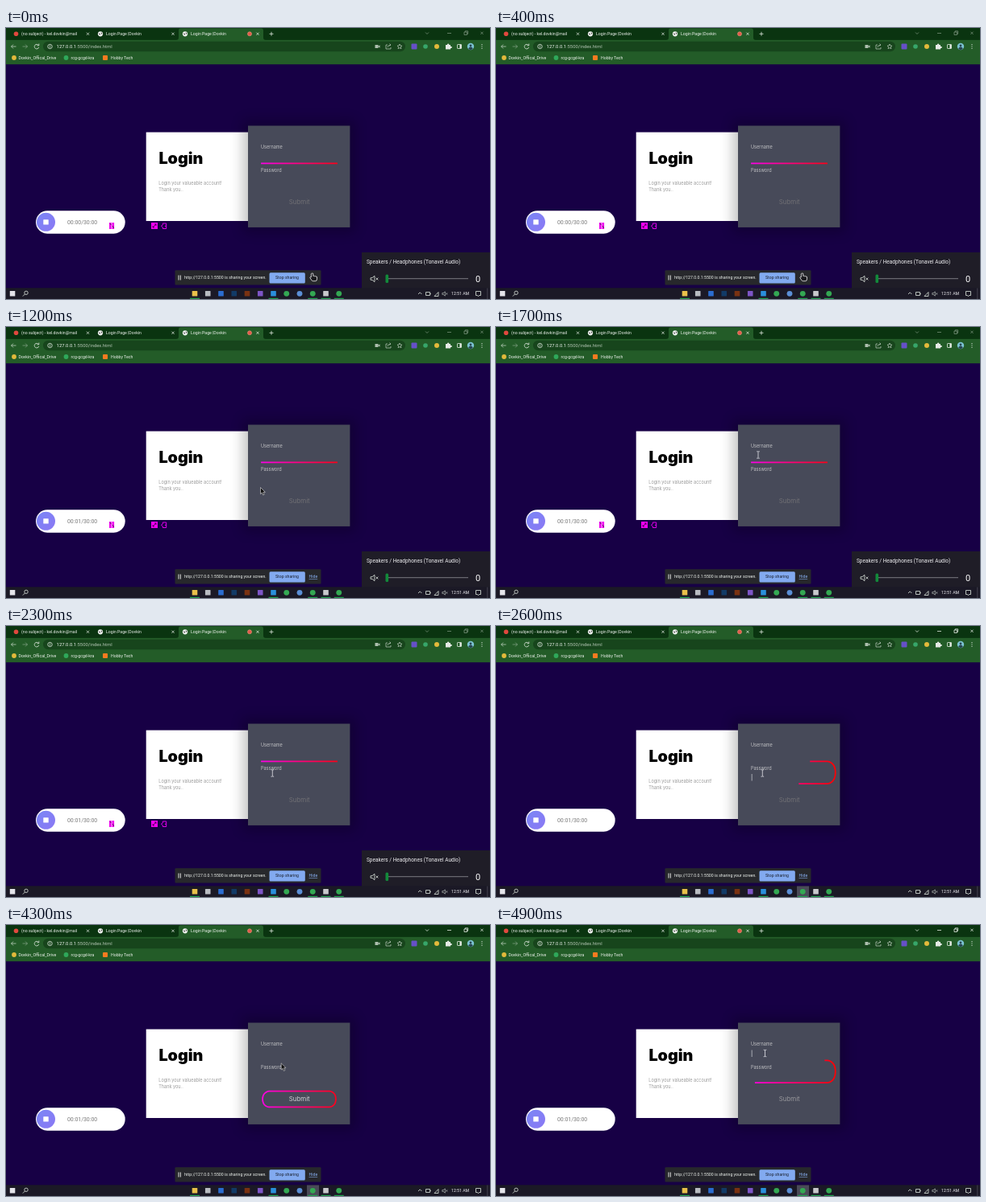
Write an HTML page that moves like this. It is 600 px wide and 337 px high and loops after 5000 ms.

```html
<!DOCTYPE html>
<html lang="en">
<head>
<meta charset="utf-8">
<title>Login page</title>
<style>
  html, body { margin: 0; width: 100%; height: 100%; overflow: hidden; background: #170045; }
  svg { display: block; width: 100vw; height: 100vh; }
  text { font: 5.2px Roboto, sans-serif; fill: #eef3ee; white-space: pre; }
  .card text { font: 5.53px Inter, sans-serif; fill: #c2c2c5; }
  .card .title { font-size: 19.75px; font-weight: 900; fill: #000; }
  .card .note { fill: #999; }
  .card .submit { font-size: 7.9px; fill: #707075; }
  .line { fill: none; stroke: #dfe8df; stroke-width: .8; }
</style>
</head>
<body>
<svg viewBox="0 0 600 337" preserveAspectRatio="none">
  <defs>
    <linearGradient id="glow" gradientUnits="userSpaceOnUse" x1="13" y1="193.5" x2="307" y2="193.5">
      <stop stop-color="#f0f"/><stop offset="1" stop-color="#f00"/>
    </linearGradient>
    <linearGradient id="violet" x2="1" y2="1">
      <stop stop-color="#7a86f5"/><stop offset="1" stop-color="#8b78f4"/>
    </linearGradient>
    <filter id="soft" x="-30%" y="-30%" width="160%" height="160%"><feGaussianBlur stdDeviation="7.9"/></filter>
    <g id="globe">
      <circle r="3.1" fill="#f2f5f2"/>
      <path d="M-2.4-.8L0-.2-.6 1.6ZM.8-2.2L2.4-.4 1 .6Z" fill="#444"/>
    </g>
    <path id="cross" class="line" d="M-1.6-1.6L1.6 1.6M1.6-1.6L-1.6 1.6"/>
    <g id="speaker" class="line">
      <path d="M-4.5-1.3h2L.4-3.8v7.6L-2.5 1.3h-2ZM2-1.4L4.8 1.4M4.8-1.4L2 1.4"/>
    </g>
  </defs>

  <rect width="600" height="337" fill="#170045"/>

  <!-- browser frame -->
  <rect width="600" height="15" fill="#0a3410"/>
  <rect y="14.900" width="600" height="30.300" fill="#235c28"/>
  <path d="M211 15q3 0 3-3V3q0-2.500 2.500-2.500h100q2.500 0 2.500 2.500v9q0 3 3 3Z" fill="#235c28"/>
  <circle cx="12.500" cy="7.300" r="2.800" fill="#e0483e"/>
  <text x="19" y="9.200">(no subject) - kel.dovkin@mail</text>
  <text x="124" y="9.200">Login Page |Dovkin</text>
  <text x="229" y="9.200">Login Page |Dovkin</text>
  <use href="#globe" x="117" y="7.300"/>
  <use href="#globe" x="222" y="7.300"/>
  <use href="#cross" x="101.500" y="7.300"/>
  <use href="#cross" x="207" y="7.300"/>
  <use href="#cross" x="312" y="7.300"/>
  <circle cx="302" cy="7.300" r="2.500" fill="#e25a4a" stroke="#f09a80" stroke-width=".6"/>
  <path class="line" d="M326.500 7.300h5M329 4.800v5"/>
  <g id="controls">
    <path class="line" d="M520 5.500l2 2 2-2M547 6.500h5M568 5h3.500v3.500h-3.500ZM569.200 5v-1.200h3.500v3.500h-1.200"/>
    <use href="#cross" x="590" y="6.300"/>
  </g>

  <rect x="46" y="16.800" width="449" height="12.400" rx="6.200" fill="#17451c"/>
  <path class="line" d="M12.500 23h-6m2.500-2.500L6.500 23 9 25.500" opacity=".8"/>
  <path class="line" d="M20.500 23h6m-2.500-2.500l2.500 2.500-2.500 2.500" opacity=".45"/>
  <path class="line" d="M40.300 21.500a2.800 2.800 0 1 0 .4 2.500M40.800 19.500v2.300h-2.300"/>
  <circle class="line" cx="54.500" cy="23" r="2.700"/>
  <path class="line" d="M54.500 22.500v2M54.500 21v.8"/>
  <text x="62.600" y="25.100" style="font-size:5.900px">127.0.0.1<tspan fill="#b4c6b4">:5500/index.html</tspan></text>
  <g opacity=".75">
    <path d="M457.500 21h4v4h-4ZM461.500 22.700l2-1.400v3.400l-2-1.400Z" fill="#dfe8df"/>
    <path class="line" d="M473 21h-2v5h6v-2M473 24q.5-3 4-3m-1.500-1.500l1.500 1.500-1.500 1.500"/>
    <path class="line" d="M488 20l.9 2 2.100.2-1.600 1.400.5 2.200-1.900-1.200-1.900 1.200.5-2.200-1.600-1.400 2.100-.2Z"/>
  </g>
  <rect x="502.500" y="19.500" width="7" height="7" rx="1" fill="#6650c8"/>
  <circle cx="520" cy="23" r="2.800" fill="#37a66a"/>
  <circle cx="534" cy="23" r="3" fill="#e2b93b"/>
  <path d="M545 21h2a1.200 1.200 0 1 1 2.300 0h1.700v2a1.200 1.200 0 1 1 0 2v1.500h-6Z" fill="#e6ebe6"/>
  <rect class="line" x="559.500" y="20.500" width="5" height="5" rx=".5"/>
  <path d="M562.500 20.500h2v5h-2Z" fill="#e6ebe6"/>
  <circle cx="576" cy="23" r="4.200" fill="#7cc3d2"/>
  <path d="M573.200 26.100q.3-2.500 2.800-2.500t2.800 2.500Q576 28.200 573.200 26.100Z" fill="#274650"/>
  <circle cx="576" cy="22" r="1.400" fill="#274650"/>
  <path d="M590 20.700v.01M590 23v.01M590 25.300v.01" stroke="#e6ebe6" stroke-width="1.200" stroke-linecap="round"/>

  <circle cx="10" cy="37" r="2.900" fill="#e2b93b"/>
  <circle cx="74.500" cy="37" r="2.900" fill="#2fa85a"/>
  <rect x="120" y="34" width="6" height="6" rx="1" fill="#f47b20"/>
  <text x="15.500" y="38.800">Dovkin_Offical_Drive</text>
  <text x="80.500" y="38.800">rcg-gcgd-kra</text>
  <text x="130" y="38.800">Hobby Tech</text>

  <!-- login card -->
  <g class="card">
    <rect x="173.700" y="129.600" width="126.500" height="110.400" fill="#fff"/>
    <text class="title" x="189.400" y="169">Login</text>
    <text class="note" x="189.300" y="194.700">Login your valueable account!</text>
    <text class="note" x="189.300" y="202.600">Thank you..</text>
    <rect x="293.700" y="115.200" width="139" height="139" fill="#000" opacity=".24" filter="url(#soft)"/>
    <rect x="300" y="121.500" width="126.400" height="126.400" fill="#474a59"/>
    <text x="316" y="150.400">Username</text>
    <text x="316" y="179">Password</text>
    <text class="submit" id="submit" x="350.700" y="219.200">Submit</text>
    <rect id="caret" x="316.800" width=".6" height="8.500" fill="#e8e8ee"/>
    <g transform="translate(300.300 121) scale(.395)">
      <path id="trail" fill="none" stroke="url(#glow)" stroke-width="4.400" d="M40 120h240c0 0 25 .8 25 35s-25 35-25 35h-240c0 0-25 4-25 38.500s25 38.500 25 38.500h215c0 0 20-1 20-25s-20-25-20-25h-190c0 0-20 1.700-20 25c0 24 20 25 20 25h168.600"/>
    </g>
  </g>

  <!-- screen recorder -->
  <rect x="37" y="227.300" width="110.700" height="28.400" rx="14.200" fill="#fff"/>
  <circle cx="49.500" cy="241.300" r="11.500" fill="url(#violet)"/>
  <rect x="46.300" y="238.200" width="6.400" height="6.400" rx=".6" fill="#fff"/>
  <text id="timer" x="76" y="243.700" style="font-size:6.900px;fill:#777"></text>
  <g id="markers">
    <path d="M128 242h2.700v8h-2.700ZM131.400 242h2.700v8h-2.700Z" fill="#f000f0"/>
    <path d="M129 243l1.300 2M132.300 246l1.400 3" stroke="#40104a" stroke-width=".8"/>
    <rect x="180" y="242" width="8" height="8" fill="#f000f0"/>
    <path d="M182 248l4-4m-2 0h2v2m-4 0v2h2" fill="none" stroke="#38004a" stroke-width=".8"/>
    <path d="M194.300 243h4.400v6.500h-4.400v-1.700l-1.900-1.500 1.900-1.500ZM197 246.300h2" fill="none" stroke="#e000e8"/>
  </g>

  <!-- sharing bar -->
  <rect x="209.500" y="301.300" width="181" height="18.200" rx="1" fill="#27282c"/>
  <path d="M214 307.500v6M216.300 307.500v6" stroke="#ddd" stroke-width="1"/>
  <text x="221" y="312.300">http://127.0.0.1:5500 is sharing your screen.</text>
  <rect x="326.500" y="304.200" width="44.300" height="13.400" rx="1.500" fill="#82aaf0"/>
  <text x="334" y="312.300" style="fill:#1c2230">Stop sharing</text>
  <text id="hide" x="375.500" y="312.300" style="fill:#8ab4f8;text-decoration:underline">Hide</text>

  <!-- volume panel -->
  <g id="volume">
    <rect x="441" y="279" width="159" height="45" fill="#1f1d27"/>
    <text x="447" y="292.600" style="font-size:6.500px;fill:#f2f2f4">Speakers / Headphones (Tonavel Audio)</text>
    <use href="#speaker" x="456.500" y="312"/>
    <path d="M474 311.700h99" stroke="#85858c" stroke-width=".9"/>
    <rect x="470.500" y="306.500" width="3.600" height="10.400" rx="1.500" fill="#128a3a"/>
    <text x="582" y="315.500" style="font-size:11px;fill:#fff">0</text>
  </g>

  <!-- taskbar -->
  <rect y="323.300" width="600" height="14" fill="#1b1926"/>
  <path d="M596.800 323.500v13.500" stroke="#55535f" stroke-width=".7"/>
  <rect x="4.800" y="327" width="6.500" height="6.500" fill="#e4e4ea"/>
  <circle class="line" cx="25" cy="329.300" r="2.200"/>
  <path class="line" d="M23.400 331l-2.600 2.600"/>
  <rect id="active" x="373" y="323.500" width="15" height="13.500" fill="#4a4a58"/>
  <g id="apps"></g>
  <path class="line" d="M511 331l2.200-2.200 2.200 2.200M520.500 328.500h5v4h-5ZM526.300 329.800v1.400M531 333.500l5-5v5Z"/>
  <use href="#speaker" transform="translate(544 330.500) scale(.7)"/>
  <text x="552" y="332.400" style="fill:#f0f0f4">12:51 AM</text>
  <path class="line" d="M582.500 327.500h6v5h-2l-1 1.300-1-1.300h-2Z"/>

  <g id="pointer">
    <path id="arrow" d="M0 0v8.200l1.900-1.700 1.300 3 1.500-.7-1.300-2.900h2.500Z" fill="#111" stroke="#ddd" stroke-width=".6"/>
    <path id="beam" d="M-1.800-4.200h1.300l.5.400.5-.4h1.300M0-3.800v7.600M-1.800 4.200h1.300l.5-.4.5.4h1.300" fill="none" stroke="#e4e4ea" stroke-width=".8"/>
    <path id="hand" d="M-1.500-5q1.300-.4 1.300 1v2.500q1-.7 1.600.2 1-.6 1.500.3 1.600-.4 1.600 1v2.200q0 2.500-2 2.500h-3q-1.200 0-2-1.600l-1.700-2.700q.2-1.400 1.500-.5v-4q0-.9 1.200-.9Z" fill="#1b1b1f" stroke="#f2f2f2" stroke-width=".8"/>
  </g>
</svg>

<script>
const $ = id => document.getElementById(id);
const LOOP = 5000, STEP = 100;
const mix = (a, b, k) => a + (b - a) * k;
const clamp = k => Math.max(0, Math.min(1, k));
const easeOutQuart = k => 1 - (1 - clamp(k)) ** 4;
const show = (id, on) => $(id).setAttribute('display', on ? 'inline' : 'none');

// Focused field over time: when, dash start, dash length
const focus = [
  { at: -1000, start: 0, length: 240 },
  { at: 2473, start: 336, length: 240 },
  { at: 3441, start: 730, length: 530 },
  { at: 4725, start: 0, length: 240 }
];
const [, PASSWORD, SUBMIT, USERNAME] = focus.map(f => f.at);

// Pointer path: time, x, y
const pointerPath = [
  [0, 381, 310], [900, 381, 310], [1200, 315.500, 199.500], [1300, 315.500, 199.500],
  [1600, 325, 159], [1700, 325, 159], [1900, 325, 164], [2200, 325, 164],
  [2300, 330.300, 183], [3100, 330.300, 183], [3400, 361.700, 218],
  [3700, 361.700, 218], [4200, 345, 178], [4500, 333.500, 159.500], [LOOP, 333.500, 159.500]
];

const apps = ['#e8c04a', '#b9bcc2', '#2b6cd0', '#123a66', '#7a3212', '#7d55c7',
  '#2a8fdc', '#34a853', '#5b8fd6', '#34a853', '#c8c8cc', '#34a853'];
const running = [0, 6, 9, 10, 11];
$('apps').innerHTML = apps.map((color, i) => {
  const x = 234 + i * 16.250;
  const icon = color === '#34a853' || i === 8
    ? `<circle cx="${x}" cy="330.300" r="3.400" fill="${color}"/>`
    : `<rect x="${x - 3.300}" y="327" width="6.600" height="6.600" rx=".6" fill="${color}"/>`;
  const bar = running.includes(i) ? `<rect x="${x - 6}" y="335.800" width="12" height="1.200" fill="#1f9d4d"/>` : '';
  return icon + bar;
}).join('');

function pointerAt(t) {
  const i = pointerPath.findIndex(p => p[0] > t);
  const [t0, x0, y0] = pointerPath[i - 1], [t1, x1, y1] = pointerPath[i];
  const k = (t - t0) / (t1 - t0);
  return [mix(x0, x1, k), mix(y0, y1, k)];
}

function drawPointer(t) {
  const [x, y] = pointerAt(t);
  const inField = x > 316 && x < 411 && ((y > 153 && y < 167) || (y > 181 && y < 197));
  const onLink = y > 303;
  $('pointer').setAttribute('transform', `translate(${x} ${y})`);
  show('beam', inField);
  show('hand', onLink);
  show('arrow', !inField && !onLink);
  show('hide', !onLink);
}

function drawTrail(t) {
  const i = focus.findLastIndex(f => f.at <= t);
  const to = focus[i], from = focus[Math.max(0, i - 1)];
  const k = easeOutQuart((t - to.at) / 700);
  $('trail').style.strokeDasharray = `${mix(from.length, to.length, k)} 1386`;
  $('trail').style.strokeDashoffset = -mix(from.start, to.start, k);
}

function drawForm(t) {
  const lit = clamp((t - SUBMIT) / 300) - clamp((t - USERNAME) / 300);
  const gray = mix(112, 208, lit);
  $('submit').style.fill = `rgb(${gray} ${gray} ${gray + 4})`;
  const inPassword = t >= PASSWORD && t < PASSWORD + 500;
  show('caret', inPassword || t >= USERNAME);
  $('caret').setAttribute('y', inPassword ? 184 : 155.500);
}

function draw(now) {
  const t = Math.floor(now % LOOP / STEP) * STEP;
  const active = t >= PASSWORD;
  show('volume', !active);
  show('markers', !active);
  show('active', active);
  $('controls').setAttribute('opacity', active ? 1 : .5);
  $('timer').textContent = t < 1000 ? '00:00/30:00' : '00:01/30:00';
  drawTrail(t);
  drawForm(t);
  drawPointer(t);
}

const begin = performance.now();
function tick() {
  draw(performance.now() - begin);
  requestAnimationFrame(tick);
}
tick();
</script>
</body>
</html>
```
